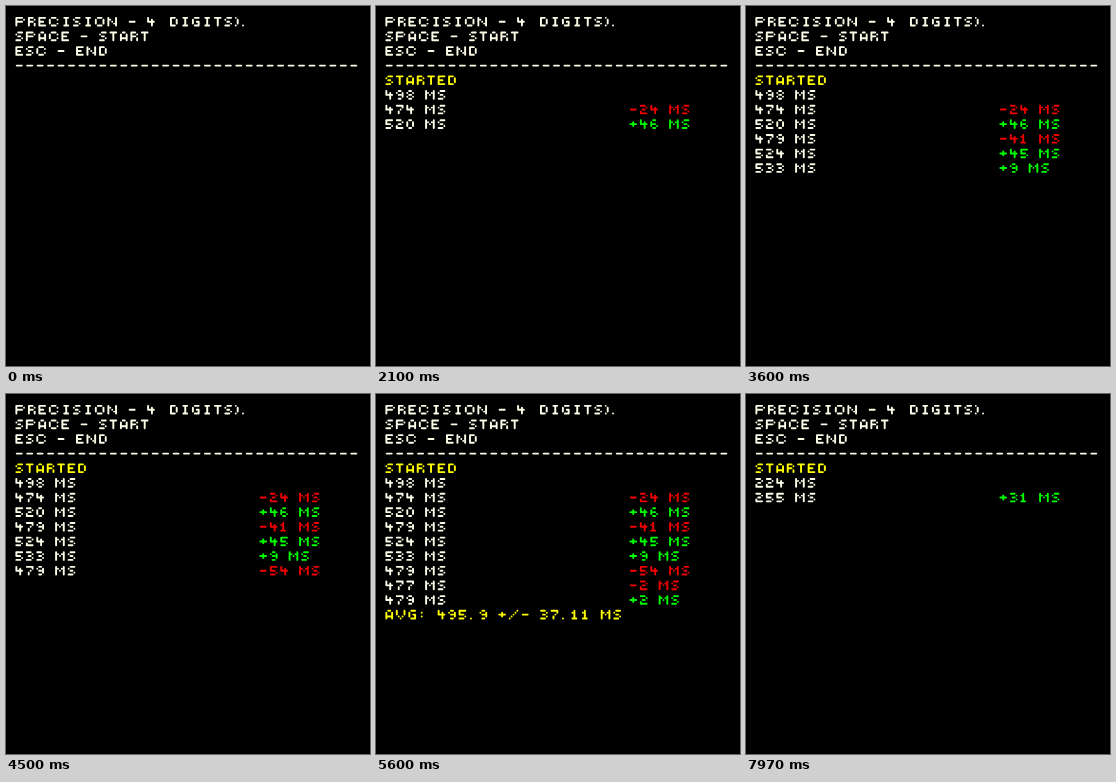
Animation of 364 by 360 pixels, one loop 8 s. Source, as an HTML page:

```html
<!DOCTYPE html>
<html lang="en">
<head>
<meta charset="utf-8">
<title>Tap timer</title>
<style>
  html, body { margin: 0; width: 100%; height: 100%; overflow: hidden; background: #000; }
  svg { display: block; width: 100%; height: 100%; }
  path { fill: none; stroke-width: 1; stroke-linecap: round; stroke-linejoin: round; }
</style>
</head>
<body>
<svg id="screen" viewBox="0 0 364 360" preserveAspectRatio="none"></svg>
<script>
const LOOP = 8000;
const CELL = 2.091, DOT = 1.92;
const LEFT = 9.4, TOP = 10.9, LINE = 7 * CELL, DELTA_X = 253.4;
const WHITE = '#fcfce8', YELLOW = '#ffff00', RED = '#f00000', GREEN = '#00ff00';

// Round-capped strokes on a five-row grid
const GLYPHS = {
  A: 'M0 4V1M1 0H2M3 1V4M0 3H3',
  C: 'M1 0H3M4 1h0M0 1V3M4 3h0M1 4H3',
  D: 'M2 0H0V4H2M3 1V3',
  E: 'M3 0H0V4H3M0 2H2',
  G: 'M3 0H1M0 1V3M1 4H3V2H2',
  I: 'M1 0H3M2 0V4M1 4H3',
  M: 'M0 4V0M4 4V0M1 1h0M2 2h0M3 1h0',
  N: 'M0 4V0M4 4V0M1 1h0M2 2h0M3 3h0',
  O: 'M1 0H3M0 1V3M4 1V3M1 4H3',
  P: 'M0 4V0H3M4 1h0M0 2H3',
  R: 'M0 4V0H2M3 1h0M0 2H2M3 3V4',
  S: 'M3 0H1M0 1h0M1 2H2M3 3h0M2 4H0',
  T: 'M0 0H3M1.5 0V4',
  V: 'M0 0V2M4 0V2M1 3h0M3 3h0M2 4h0',
  0: 'M1 0H2M0 1V3M3 1V3M1 4H2',
  1: 'M0 1h0M1 0V4M0 4H2',
  2: 'M0 0H2M3 1h0M1 2H2M0 3V4H3',
  3: 'M0 0H2M3 1h0M1 2H2M3 3h0M0 4H2',
  4: 'M0 0V2H3M2 1V4',
  5: 'M3 0H0V2H2M3 3h0M0 4H2',
  6: 'M2 0H1M0 1V3M1 2H2M3 3h0M1 4H2',
  7: 'M0 0H3V1M2 2h0M1 3V4',
  8: 'M1 0H2M0 1h0M3 1h0M1 2H2M0 3h0M3 3h0M1 4H2',
  9: 'M1 0H2M0 1h0M3 1V3M1 2H2M1 4H2',
  '+': 'M0 2H3M1.5 1V3',
  '-': 'M.2 2H2.8',
  '/': 'M0 4h0M1 3h0M2 2h0M3 1h0M4 0h0',
  ':': 'M1 1h0M1 3h0',
  '.': 'M.5 4h0',
  ')': 'M0 0h0M1 1V3M0 4h0'
};

// Pen movement in cells
function advance(char) {
  if (char === ')') return 3;
  if (char === ' ') return 4;
  if (char === 'I') return 5.5;
  return 'CMNOPV/'.includes(char) ? 6 : 5;
}

const screen = document.getElementById('screen');
const timed = [];

function add(parent, tag, attributes) {
  const node = document.createElementNS('http://www.w3.org/2000/svg', tag);
  for (const name in attributes) node.setAttribute(name, attributes[name]);
  return parent.appendChild(node);
}

function write(text, row, color, x = LEFT) {
  const line = add(screen, 'g', {
    role: 'img',
    'aria-label': text,
    stroke: color,
    transform: `translate(${x} ${TOP + row * LINE})`
  });
  let pen = 0;
  for (const char of text) {
    if (GLYPHS[char]) {
      add(line, 'path', {
        d: GLYPHS[char],
        transform: `translate(${pen * CELL} 0) scale(${DOT}) translate(.5 .5)`
      });
    }
    pen += advance(char);
  }
  return line;
}

function show(node, from, to = LOOP) {
  timed.push({ node, from, to });
}

function writeTaps(taps, end) {
  taps.forEach(([time, value], i) => {
    const row = 5 + i;
    show(write(`${value} MS`, row, WHITE), time, end);
    if (i === 0) return;
    const delta = value - taps[i - 1][1];
    const label = `${delta > 0 ? '+' : ''}${delta} MS`;
    show(write(label, row, delta > 0 ? GREEN : RED, DELTA_X), time, end);
  });
}

const CLEAR = 7530;
write('PRECISION - 4', 0, WHITE);
write('DIGITS).', 0, WHITE, 164);
write('SPACE - START', 1, WHITE);
write('ESC - END', 2, WHITE);
write('-'.repeat(33), 3, WHITE);
show(write('STARTED', 4, YELLOW), 600);

const firstRun = [
  [1100, 498], [1600, 474], [2100, 520], [2600, 479], [3100, 524],
  [3600, 533], [4130, 479], [4570, 477], [5070, 479]
];
writeTaps(firstRun, CLEAR);
const mean = firstRun.reduce((sum, tap) => sum + tap[1], 0) / firstRun.length;
show(write(`AVG: ${mean.toFixed(1)} +/- 37.11 MS`, 14, YELLOW), 5400, CLEAR);
writeTaps([[7730, 224], [7970, 255]], LOOP);

function render(time) {
  for (const { node, from, to } of timed) {
    node.setAttribute('visibility', time >= from && time < to ? 'visible' : 'hidden');
  }
}

const start = performance.now();
function tick() {
  render((performance.now() - start) % LOOP);
  requestAnimationFrame(tick);
}
tick();
</script>
</body>
</html>
```
